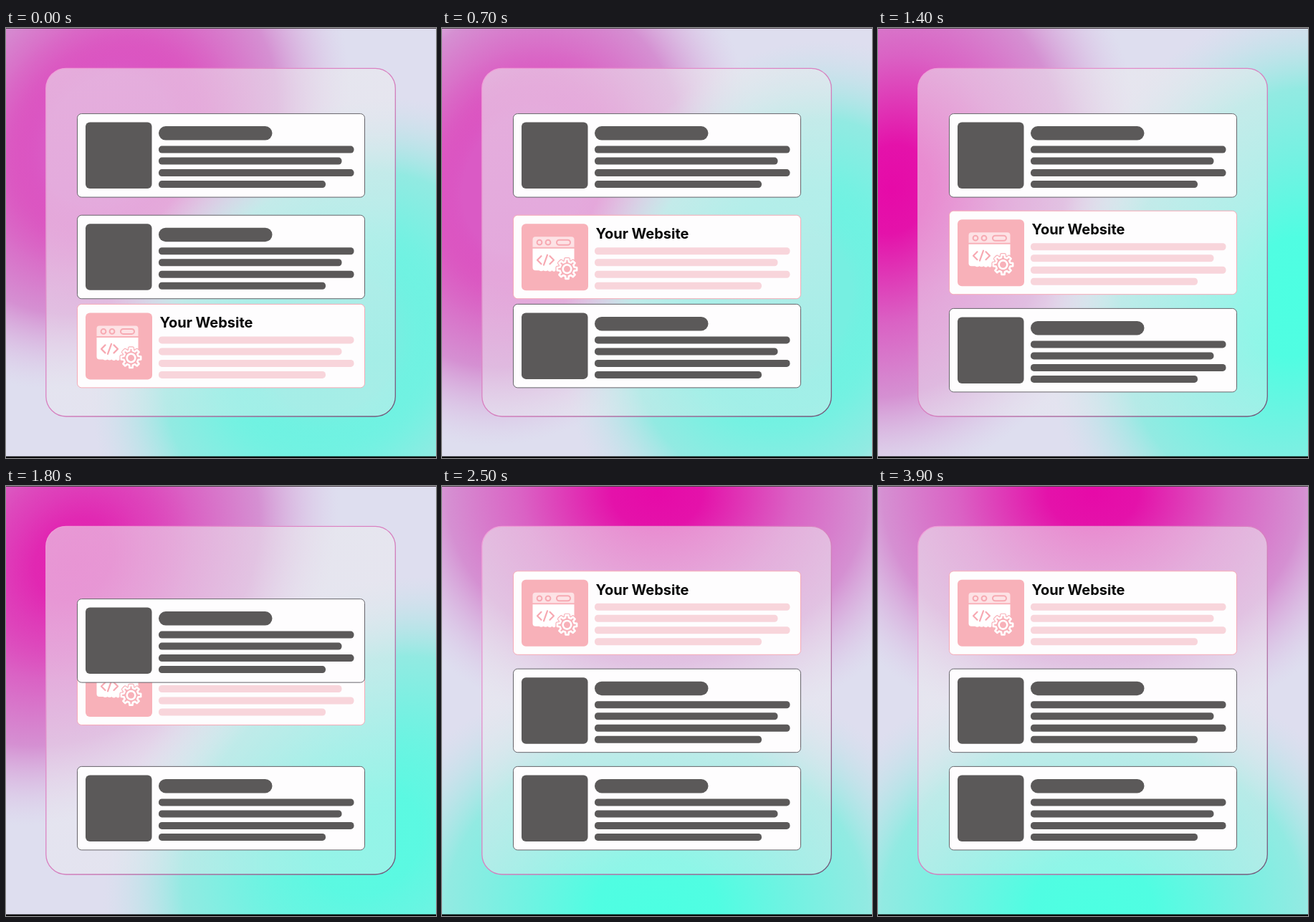
An HTML page for the animation above (4 s loop, 600 px wide and 600 px high).

```html
<!DOCTYPE html>
<html lang="en">
<head>
<meta charset="utf-8">
<title>Your Website</title>
<style>
  html, body { margin: 0; width: 100%; height: 100%; overflow: hidden; background: #dedeef; }
  svg { display: block; width: 600px; height: 600px; }
  .title { font: 700 20px Inter, "Open Sans", sans-serif; fill: #050505; }
</style>
</head>
<body>
<svg viewBox="0 0 600 600">
  <defs>
    <radialGradient id="pink">
      <stop offset="0" stop-color="#e60aa8"/>
      <stop offset=".15" stop-color="#e412aa"/>
      <stop offset=".45" stop-color="#da62c4"/>
      <stop offset=".7" stop-color="#d590d2"/>
      <stop offset="1" stop-color="#dcc4e6" stop-opacity="0"/>
    </radialGradient>
    <radialGradient id="teal">
      <stop offset="0" stop-color="#4dffe2"/>
      <stop offset=".2" stop-color="#50fde2"/>
      <stop offset=".45" stop-color="#72f2e2"/>
      <stop offset=".7" stop-color="#92eae2"/>
      <stop offset="1" stop-color="#c8e2ea" stop-opacity="0"/>
    </radialGradient>
    <radialGradient id="pinkSoft">
      <stop offset=".5" stop-color="#da5ac5"/>
      <stop offset="1" stop-color="#da62c4" stop-opacity="0"/>
    </radialGradient>
    <radialGradient id="tealSoft">
      <stop offset=".5" stop-color="#76efe1"/>
      <stop offset="1" stop-color="#76f0e2" stop-opacity="0"/>
    </radialGradient>
    <linearGradient id="glass" x2=".25" y2="1">
      <stop offset="0" stop-color="#ecebee" stop-opacity=".58"/>
      <stop offset=".6" stop-color="#ecebf0" stop-opacity=".54"/>
      <stop offset="1" stop-color="#ecebf0" stop-opacity=".4"/>
    </linearGradient>
    <linearGradient id="rim" x2="1" y2="1">
      <stop offset="0" stop-color="#f0a0d8"/>
      <stop offset=".5" stop-color="#d880c0"/>
      <stop offset="1" stop-color="#705878"/>
    </linearGradient>

    <g id="lines">
      <rect x="213" y="45" width="272.5" height="10" rx="4.5"/>
      <rect x="213" y="61" width="255.5" height="10" rx="4.5"/>
      <rect x="213" y="77.5" width="272.5" height="10" rx="4.5"/>
      <rect x="213" y="93.5" width="233" height="10" rx="4.5"/>
    </g>
    <g id="dark" fill="#5b5959">
      <rect x="99.5" width="401" height="116.5" rx="6" fill="#fefdfe" stroke="#66646a"/>
      <rect x="111" y="12" width="92.5" height="92.5" rx="6"/>
      <rect x="213" y="17.5" width="158.5" height="19.5" rx="9.75"/>
      <use href="#lines"/>
    </g>
  </defs>

  <rect width="600" height="600" fill="#dedeef"/>
  <g id="sky">
    <g id="top">
      <ellipse rx="420" ry="340" fill="url(#pink)"/>
      <ellipse class="soft" rx="220" ry="180" fill="url(#pinkSoft)"/>
    </g>
    <g id="bottom">
      <ellipse rx="420" ry="340" fill="url(#teal)"/>
      <ellipse class="soft" rx="220" ry="180" fill="url(#tealSoft)"/>
    </g>
  </g>
  <rect x="55.8" y="56.3" width="487.5" height="485.7" rx="28" fill="url(#glass)" stroke="url(#rim)" stroke-width="1.3"/>

  <g id="site">
    <rect x="99.5" width="401" height="116.5" rx="6" fill="#fefdfe" stroke="#f6a9b5"/>
    <rect x="111" y="12" width="93" height="93" rx="6" fill="#f8b1b9"/>
    <text class="title" x="214.5" y="32.8">Your Website</text>
    <use href="#lines" fill="#f8d5db"/>
    <path d="M126.5 44.5V34a4 4 0 0 1 4-4h50a4 4 0 0 1 4 4v10.500z" fill="#fde2e5"/>
    <g fill="none" stroke="#f7a9b2" stroke-width="2">
      <circle cx="136" cy="38" r="3.4"/>
      <circle cx="148" cy="38" r="3.4"/>
      <rect x="160" y="34.500" width="19" height="7" rx="3.5"/>
    </g>
    <path d="M126.500 46.500h58V77h-26q-2 3-5 0q-3 3-6 0q-3 2-6 0q-3 2-6 0h-5q-4 0-4-4z" fill="#fff"/>
    <path d="M138.500 57l-5.500 5.500 5.500 5.500M150.500 57l5.500 5.500-5.500 5.500M147 55.500l-5 14"
      fill="none" stroke="#f7a9b2" stroke-width="2.2" stroke-linecap="round" stroke-linejoin="round"/>
    <g transform="translate(174.500 75)" stroke-linejoin="round">
      <path class="gear" fill="#f8b1b9" stroke="#f8b1b9" stroke-width="5"/>
      <path class="gear" fill="#f8b1b9" stroke="#fff" stroke-width="2.6"/>
      <circle r="5.800" fill="none" stroke="#fff" stroke-width="2.6"/>
    </g>
  </g>
  <use id="low" href="#dark"/>
  <use id="high" href="#dark"/>

  <rect width="600" height="1" fill="#4a4048"/>
  <rect y="597.700" width="600" height="2.300" fill="#000"/>
</svg>
<script>
  const LOOP = 4000, STEP = 100;
  const ROWS = [119.2, 255.2, 391.4];
  // time, angle, distance from centre, softness
  const SKY = [
    [0, -48, 215, 1],
    [700, -66, 205, 1],
    [1400, -75, 290, 0],
    [1500, -73, 290, 0],
    [1800, -46, 285, .3],
    [2200, -7, 290, 0],
    [2500, 0, 290, 0]
  ];

  const $ = id => document.getElementById(id);
  const all = sel => document.querySelectorAll(sel);
  const mix = (a, b, p) => a + (b - a) * p;
  const clamp = x => Math.min(1, Math.max(0, x));
  const place = (id, y) => $(id).setAttribute('transform', `translate(0 ${y})`);

  // Nearly linear travel with softened ends
  function travel(t, start, end, soft) {
    const x = clamp((t - start) / (end - start));
    return x - soft * Math.sin(2 * Math.PI * x) / (2 * Math.PI);
  }

  function skyAt(t) {
    const i = SKY.findIndex(k => k[0] > t);
    if (i < 0) return SKY[SKY.length - 1];
    const a = SKY[i - 1], b = SKY[i];
    const p = (t - a[0]) / (b[0] - a[0]);
    return a.map((v, j) => mix(v, b[j], p));
  }

  function gearPath(teeth, inner, outer) {
    const pts = [];
    for (let i = 0; i < teeth; i++) {
      [[-.3, inner], [-.19, outer], [.19, outer], [.3, inner]].forEach(([off, r]) => {
        const a = (i + off) * 2 * Math.PI / teeth;
        pts.push((r * Math.cos(a)).toFixed(2) + ' ' + (r * Math.sin(a)).toFixed(2));
      });
    }
    return 'M' + pts.join('L') + 'Z';
  }

  function draw(t) {
    const [, angle, dist, soft] = skyAt(t);
    const size = 1 - .1 * soft;
    $('sky').setAttribute('transform', `rotate(${angle} 300 300)`);
    $('top').setAttribute('transform', `translate(300 ${300 - dist}) scale(${size})`);
    $('bottom').setAttribute('transform', `translate(300 ${300 + dist}) scale(${size})`);
    all('.soft').forEach(e => e.setAttribute('opacity', soft));

    const first = travel(t, -50, 750, .3);
    const second = travel(t, 1500, 2500, .13);
    const [r0, r1, r2] = ROWS;
    place('low', mix(r1, r2, first));
    place('high', mix(r0 + .4, r1, second));
    place('site', mix(mix(r2, r1, first), r0 - .4, second));
  }

  all('.gear').forEach(e => e.setAttribute('d', gearPath(8, 10.3, 13.8)));

  const began = performance.now();
  function tick() {
    const t = (performance.now() - began) % LOOP;
    draw(Math.floor(t / STEP) * STEP);
    requestAnimationFrame(tick);
  }
  tick();
</script>
</body>
</html>
```
